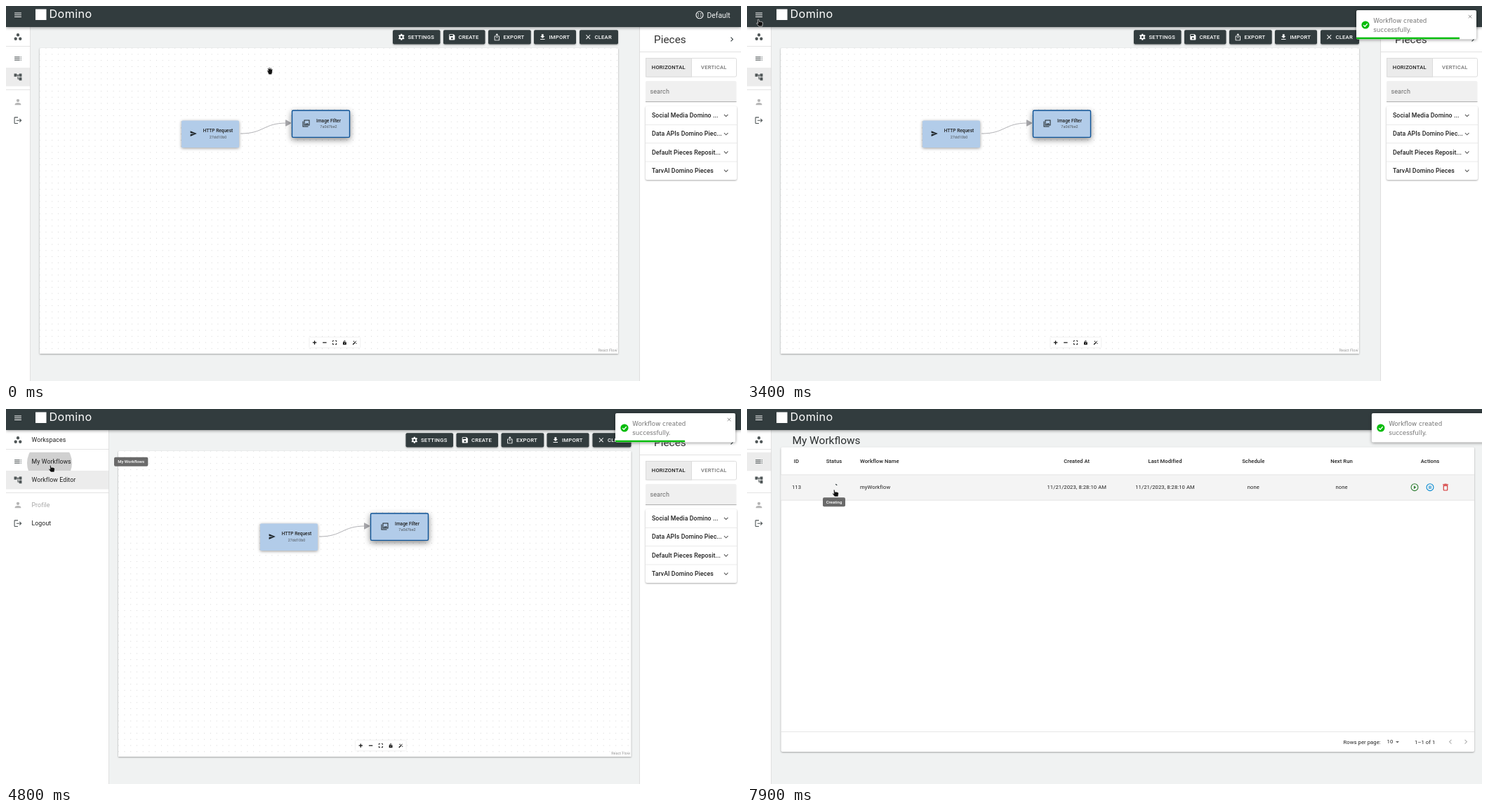
An HTML page that plays this animation: 1047x535 px, repeating every 8 s.

```html
<!DOCTYPE html>
<html lang="en">
<head>
<meta charset="utf-8">
<title>Workflow editor</title>
<style>
html, body { margin: 0; width: 100%; height: 100%; overflow: hidden; background: #f0f2f2; }
svg { display: block; width: 1047px; height: 535px; font-family: Roboto, sans-serif; }
text { white-space: pre; }
.low { filter: drop-shadow(0 1px 1px #0005); }
.mid { filter: drop-shadow(0 1px 2px #0006); }
.high { filter: drop-shadow(0 3px 4px #0007); }
.caps { letter-spacing: .02857em; font-weight: 500; }
.body { letter-spacing: .00938em; }
.cell { letter-spacing: .01071em; }
</style>
</head>
<body>
<svg id="stage" viewBox="0 0 1047 535"></svg>
<script>
const DARK = '#323c3e', INK = '#212121', GREEN = '#07bc0c';
const ICONS = {
  menu: 'M3 18h18v-2H3zm0-5h18v-2H3zm0-7v2h18V6z',
  spaces: 'M6 13a4 4 0 100 8 4 4 0 000-8zm6-10a4 4 0 100 8 4 4 0 000-8zm6 10a4 4 0 100 8 4 4 0 000-8z',
  list: 'M3 9h14V7H3zm0 4h14v-2H3zm0 4h14v-2H3zm16 0h2v-2h-2zm0-10v2h2V7zm0 6h2v-2h-2z',
  tree: 'M22 11V3h-7v3H9V3H2v8h7V8h2v10h4v3h7v-8h-7v3h-2V8h2v3z',
  person: 'M12 12a4 4 0 100-8 4 4 0 000 8zm0 2c-2.67 0-8 1.34-8 4v2h16v-2c0-2.66-5.33-4-8-4z',
  logout: 'M17 7l-1.4 1.4 2.6 2.6H8v2h10.2l-2.6 2.6L17 17l5-5zM4 5h8V3H4a2 2 0 00-2 2v14a2 2 0 002 2h8v-2H4z',
  gear: 'M10 2h4l.5 3 2 1 2.8-1.100 2 3.500-2.300 1.900v3.400l2.300 1.900-2 3.500-2.800-1.100-2 1-.5 3h-4l-.5-3-2-1-2.800 1.100-2-3.500L5 13.700v-3.400L2.700 8.400l2-3.500L7.500 6l2-1zm2 6.500a3.500 3.500 0 100 7 3.500 3.500 0 000-7z',
  save: 'M17 3H5a2 2 0 00-2 2v14a2 2 0 002 2h14a2 2 0 002-2V7zm-5 16a3 3 0 110-6 3 3 0 010 6zm3-10H5V5h10z',
  share: 'M16 5l-1.400 1.400L13 4.800V16h-2V4.800L9.400 6.400 8 5l4-4zm4 5v11a2 2 0 01-2 2H6a2 2 0 01-2-2V10a2 2 0 012-2h3v2H6v11h12V10h-3V8h3a2 2 0 012 2z',
  load: 'M5 20h14v-2H5zM19 9h-4V3H9v6H5l7 7z',
  cross: 'M19 6.400L17.600 5 12 10.600 6.400 5 5 6.400 10.600 12 5 17.600 6.400 19 12 13.400 17.600 19 19 17.600 13.400 12z',
  down: 'M16.600 8.600L12 13.200 7.400 8.600 6 10l6 6 6-6z',
  right: 'M10 6L8.600 7.400l4.600 4.600-4.600 4.600L10 18l6-6z',
  left: 'M14 6l1.400 1.400-4.600 4.600 4.600 4.600L14 18l-6-6z',
  caret: 'M7 10l5 5 5-5z',
  send: 'M2 21l21-9L2 3v7l15 2-15 2z',
  photos: 'M20 4v12H8V4zm2-2H6v16h16zM11.500 11.700l1.700 2.300 2.500-3.100L19 15H9zM2 6v16h16v-2H4V6z',
  play: 'M10 16.500l6-4.500-6-4.500zM12 2a10 10 0 100 20 10 10 0 000-20zm0 18a8 8 0 110-16 8 8 0 010 16z',
  pause: 'M9 16h2V8H9zm4-8v8h2V8zM12 2a10 10 0 100 20 10 10 0 000-20zm0 18a8 8 0 110-16 8 8 0 010 16z',
  bin: 'M6 19a2 2 0 002 2h8a2 2 0 002-2V7H6zM8 9h8v10H8zm7.500-5l-1-1h-5l-1 1H5v2h14V4z',
  plus: 'M3 10h7V3h4v7h7v4h-7v7h-4v-7H3z',
  minus: 'M3 10h18v4H3z',
  fit: 'M2 2h7v3H5v4H2zm13 0h7v7h-3V5h-4zM2 15h3v4h4v3H2zm17 0h3v7h-7v-3h4z',
  lock: 'M4 10h3V7a5 5 0 0110 0h-3a2 2 0 00-4 0v3h10v12H4zm8 4a2 2 0 100 4 2 2 0 000-4z',
  wand: 'M2 20L14 8l3 3L5 23zM15 7l2-2 3 3-2 2zM8 2l1 3 3 1-3 1-1 3-1-3-3-1 3-1zM20 13l1 2 2 1-2 1-1 2-1-2-2-1 2-1zM20 1l1 2-2 1z'
};

const rect = (x, y, w, h, fill, more = '') =>
  `<rect x="${x}" y="${y}" width="${w}" height="${h}" fill="${fill}" ${more}/>`;
const text = (x, y, s, size, fill = INK, more = '') =>
  `<text x="${x}" y="${y}" font-size="${size}" fill="${fill}" ${more}>${s}</text>`;
const path = (d, more) => `<path d="${d}" ${more}/>`;
const icon = (name, x, y, size = 13.1, fill = DARK) =>
  path(ICONS[name], `fill="${fill}" fill-rule="evenodd" transform="translate(${x - size / 2} ${y - size / 2}) scale(${size / 24})"`);
const group = (id, body, more = '') => `<g id="${id}" ${more}>${body}</g>`;
const middle = 'text-anchor="middle"', bold = 'font-weight="500"';

const button = (x, w, label, name) =>
  rect(x, 34.3, w, 20.2, DARK, `rx="2" class="low" ${name == 'save' ? 'id="create"' : ''}`) +
  icon(name, x + 12.3, 44.3, 10.9, '#fff') + text(x + 21.5, 47, label, 7.65, '#fff', 'class="caps"');

const node = (x, y, title, code, name, active) =>
  rect(x, y, 82, 38.4, '#b2cce9', `rx="1.6" class="${active ? 'high' : 'mid'}" ${active ? 'stroke="#0e5396" stroke-width="1.4"' : ''}`) +
  icon(name, x + (active ? 20 : 17), y + 18.5, active ? 12 : 10.5, '#1c2225') +
  text(x + 52, y + 16.700, title, 6.56, INK, `${middle} ${bold}`) +
  text(x + 52, y + 25.300, code, 5.46, '#50565c', middle);

const tip = (id, x, y, w, label) => group(id,
  rect(x, y, w, 13, '#616161', 'rx="2" opacity=".94"') + text(x + w / 2, y + 8.700, label, 6, '#fff', `${middle} ${bold}`));

const editor = group('editor',
  rect(48, 60, 824, 436, '#fff', 'id="paper" class="low"') +
  group('flow',
    rect(48, 60, 824, 436, 'url(#dots)', 'id="grid"') +
    path('M334 182C368 182 366 167 400 167', 'fill="none" stroke="#b1b1b5"') +
    path('M398.500 162.700L406 167l-7.500 4.300z', 'fill="#a9a9ad" stroke="#a9a9ad" stroke-linejoin="round"') +
    node(250, 163.600, 'HTTP Request', '27dd10b0', 'send') +
    node(407.500, 149, 'Image Filter', '7a0d7be2', 'photos', true)) +
  group('controls', rect(432.500, 473, 71.500, 14.200, '#fff', 'style="filter:drop-shadow(0 0 1px #0002)"') +
    ['plus', 'minus', 'fit', 'lock', 'wand'].map((n, i) => icon(n, 439.600 + i * 14.250, 480.200, 7.200, '#111')).join('')) +
  group('tools',
    button(551, 67.500, 'SETTINGS', 'gear') + button(623, 59.500, 'CREATE', 'save') +
    button(687, 60.700, 'EXPORT', 'share') + button(752, 60, 'IMPORT', 'load') +
    button(817, 55, 'CLEAR', 'cross') +
    text(870.500, 493, 'React Flow', 5.460, '#999', 'text-anchor="end"')) +
  rect(902.500, 28, 146, 510, '#fff', 'stroke="#dedede"') +
  text(923, 53, 'Pieces', 15.400, '#333') + icon('right', 1034, 47.500, 13) +
  rect(903, 65, 144, 1, '#e2e2e2') +
  rect(911.500, 74.500, 129, 26.500, '#fff', 'rx="2" stroke="#dcdcdc"') +
  rect(911.500, 74.500, 65, 26.500, '#ebebeb', 'stroke="#dcdcdc"') +
  text(943.800, 90.300, 'HORIZONTAL', 7.600, INK, `class="caps" ${middle}`) +
  text(1008.300, 90.300, 'VERTICAL', 7.600, '#757575', `class="caps" ${middle}`) +
  path('M911 137v-28q0-2 2-2h125.500q2 0 2 2v28z', 'fill="#f0f0f0"') + rect(911, 136.400, 129.500, .7, '#8c8c8c') +
  text(917.500, 125, 'search', 9, '#6b6b6b', 'class="body"') +
  rect(911, 143, 130, 105, '#fff', 'rx="2" class="low"') +
  ['Social Media Domino ...', 'Data APIs Domino Piec...', 'Default Pieces Reposit...', 'TarvAI Domino Pieces'].map((s, i) =>
    (i ? rect(911, 142.800 + i * 26.300, 130, .6, '#dcdcdc') : '') +
    text(920, 159 + i * 26.300, s, 8.750, INK, `class="body" ${bold}`) +
    icon('down', 1025.700, 156.200 + i * 26.300, 12.500, '#555')).join(''));

const stamp = '11/21/2023, 8:28:10 AM';
const columns = [['ID', 70.500, '113'], ['Status', 124, ''], ['Workflow Name', 161, 'myWorkflow'], ['Created At', 469.700, stamp],
  ['Last Modified', 595.500, stamp], ['Schedule', 721.300, 'none'], ['Next Run', 847, 'none'], ['Actions', 973, '']];
const table = group('table',
  text(64.500, 49.700, 'My Workflows', 15.450, '#2b2f30') +
  rect(48.500, 54.500, 987.500, 434.500, '#fff', 'rx="2" class="low"') +
  rect(48.500, 94, 987.500, 36, '#f4f4f4', 'id="row"') +
  [93.500, 129.800, 460].map(y => rect(48.500, y, 987.500, .7, '#dcdcdc')).join('') +
  columns.map(([head, x, value], i) => {
    const style = `class="cell" ${i == 2 ? '' : middle}`;
    return text(x, 76.600, head, 7.650, INK, `${style} ${bold}`) + text(x, 114, value, 7.650, INK, style);
  }).join('') +
  `<circle id="spinner" cx="124" cy="112" r="5.200" fill="none" stroke="${DARK}" stroke-width="1.200" pathLength="126.900"/>` +
  icon('play', 951, 111.700, 13.100, '#2e7d32') + icon('pause', 973, 111.700, 13.100, '#0288d1') +
  icon('bin', 995, 111.700, 13.100, '#d32f2f') +
  text(849.500, 477.600, 'Rows per page:', 7.650, INK, 'class="cell"') + text(911.500, 477.200, '10', 7.650, INK, 'class="cell"') +
  icon('caret', 926.500, 475, 12, '#666') + text(951, 477.600, '1–1 of 1', 7.650, INK, 'class="cell"') +
  icon('left', 1002, 474.700, 13, '#b0b0b0') + icon('right', 1024, 474.700, 13, '#b0b0b0'));

const links = [['spaces', 44, 'Workspaces'], ['list', 75, 'My Workflows'], ['tree', 101.300, 'Workflow Editor'],
  ['person', 137, 'Profile'], ['logout', 163.200, 'Logout']];
const drawer = group('drawer',
  rect(0, 28, 147, 507, '#fff') + rect(0, 88, 147, 26.500, '#ececec', 'id="current"') +
  '<circle id="ripple" cx="62" cy="77" fill="#d0d0d0" clip-path="url(#item)"/>' +
  rect(0, 57, 147, .8, '#dcdcdc') + rect(0, 119, 147, .8, '#dcdcdc') +
  links.map(([n, y]) => icon(n, 17, y, 13.100, n == 'person' ? '#b5b5b5' : '#505758')).join('') +
  group('labels', links.map(([n, y, s]) => text(36.500, y + 3.100, s, 8.750, n == 'person' ? '#a6a6a6' : INK, 'class="body"')).join('')),
  'clip-path="url(#side)"') + rect(34, 28, .8, 507, '#dadada', 'id="edge"');

const header = rect(0, -4, 1047, 34, DARK, 'class="mid"') +
  '<circle id="focus" cx="17" cy="12.500" r="10" fill="#fff" opacity=".1"/>' +
  icon('menu', 17, 12.700, 13.100, '#fff') + rect(42, 4.500, 15.500, 15.500, '#fff') +
  text(61.500, 17, 'Domino', 16.200, '#fff', 'style="font-family:Inter,sans-serif;letter-spacing:.4px"') +
  '<circle cx="988" cy="12.800" r="5" fill="none" stroke="#fff" stroke-width="1.100"/>' +
  [-1.800, 1.800].map(x => [-1.500, 1.500].map(y => `<circle cx="${988 + x}" cy="${12.800 + y}" r=".8" fill="#fff"/>`).join('')).join('') +
  text(998.500, 16.500, 'Default', 10.400, '#f2f4f4');

const toast = group('toast',
  rect(868, 6, 171, 41.500, '#fff', 'rx="2" class="mid"') +
  rect(868, 44.700, 171, 2.800, GREEN, 'id="bar" clip-path="url(#card)"') +
  `<circle cx="881" cy="27" r="5.600" fill="${GREEN}"/>` +
  path('M878.200 27.200l2 2 3.600-4', 'fill="none" stroke="#fff" stroke-width="1.300"') +
  ['Workflow created', 'successfully.'].map((s, i) =>
    text(892.300, 23.800 + i * 13.300, s, 8.720, '#757575', 'style="font-family:\'DejaVu Sans\',sans-serif"')).join('') +
  path('M1027.800 12.800l4.600 4.600m0-4.600l-4.600 4.600', 'stroke="#8a8a8a" stroke-width=".9"'));

const outline = 'fill="#111" stroke="#fff" stroke-width=".6" stroke-linejoin="round"';
const cursor = group('cursor',
  group('grab', path('M-3.800 0q-1-1.500.3-1.500l1 1-.8-3.500q.7-1.300 1.500.2l.3 1-.2-2q.9-1.200 1.600 0l.2 1.800.4-1.600q1-.8 1.500.3l-.2 2 .6-.9q1-.4 1.300.5L3.300 2 2.300 4.800h-4z', outline)) +
  group('arrow', path('M-3-5v9.500l2.200-2 1.400 3 1.400-.7-1.400-2.800h3z', outline)) +
  group('hand', path('M-2.800-4.500q.9-1.200 1.700 0l.6 3 1-.4.8.4 1-.2.8.6 1 .2.4 1.200L3.800 5h-5L-4.300.900q.2-1.300 1.300-.6l.8.7z', outline)));

document.getElementById('stage').innerHTML = `<defs>
  <pattern id="dots" x="47.700" y="59.700" width="8.747" height="8.747" patternUnits="userSpaceOnUse"><circle cx=".45" cy=".45" r=".42" fill="#aaa"/></pattern>
  <clipPath id="side"><rect id="sideBox" y="28" width="34.500" height="507"/></clipPath>
  <clipPath id="item"><rect y="61.800" width="147" height="26.300"/></clipPath>
  <clipPath id="card"><rect x="868" y="6" width="171" height="41.500" rx="2"/></clipPath>
</defs>` + rect(0, 0, 1047, 535, '#f0f2f2') + editor + table + drawer + header +
  tip('menuTip', 154, 68.700, 48.300, 'My Workflows') + tip('statusTip', 108, 126.200, 32, 'Creating') + toast + cursor;

const $ = id => document.getElementById(id);
const set = (id, attrs) => { for (const k in attrs) $(id).setAttribute(k, attrs[k]); };
const show = (id, on) => { $(id).style.display = on ? '' : 'none'; };
const move = (id, x, y = 0) => set(id, { transform: `translate(${x} ${y})` });
const clamp = v => Math.max(0, Math.min(1, v));

function bezier(x1, y1, x2, y2) {
  const at = (a, b, u) => 3 * a * u * (1 - u) ** 2 + 3 * b * u * u * (1 - u) + u ** 3;
  return p => {
    let lo = 0, hi = 1;
    for (let i = 0; i < 20; i++) {
      const m = (lo + hi) / 2;
      if (at(x1, x2, m) < p) lo = m; else hi = m;
    }
    return at(y1, y2, lo);
  };
}
const linear = p => p, ease = bezier(.25, .1, .25, 1), standard = bezier(.4, 0, .2, 1);
const inOut = bezier(.42, 0, .58, 1), bounce = bezier(.215, .61, .355, 1);

// Value at time t along [time, value...] keys.
function along(keys, t, easing = linear) {
  if (t <= keys[0][0]) return keys[0].slice(1);
  const i = keys.findIndex(k => k[0] > t);
  if (i < 0) return keys[keys.length - 1].slice(1);
  const a = keys[i - 1], b = keys[i], p = easing((t - a[0]) / (b[0] - a[0]));
  return a.slice(1).map((v, j) => v + (b[j + 1] - v) * p);
}

const trail = [[200, 376, 93], [350, 380, 103], [500, 410, 106], [700, 510, 92], [900, 605, 70], [1050, 642, 57], [1300, 644, 52],
  [2300, 644, 52], [2450, 600, 57], [2700, 350, 48], [2950, 70, 26], [3100, 18, 20], [3250, 18, 24], [3500, 18, 24],
  [3750, 39, 56], [3950, 59, 72], [4250, 66, 88], [4550, 65, 85], [5800, 65, 85], [6000, 82, 98], [6250, 126, 120]];
const enter = [[1883, 1640], [2303, -13.700], [2408, 5.500], [2513, -2.700], [2583, 0]];
const leave = [[7735, 0], [7875, -10.900], [8435, 1093]];
const pageAt = 4850;

function draw(t) {
  const onTable = t >= pageAt;
  const open = onTable ? 0 : standard(clamp((t - 3500) / 225));
  show('editor', !onTable);
  show('table', onTable);

  const shift = 112 * open, width = 824 - 93.500 * open;
  set('paper', { x: 48 + shift, width });
  set('grid', { width });
  move('flow', shift);
  move('tools', 18.500 * open);
  move('controls', 65.700 * open);
  set('create', { fill: t > 1050 && t < 2400 ? '#20282a' : DARK });

  set('sideBox', { width: 34.500 + shift });
  set('edge', { x: 34 + shift });
  set('current', { y: onTable ? 61.800 : 88 });
  set('labels', { opacity: open });
  show('focus', t >= 3450 && t < 3900);
  show('ripple', t >= 4700 && !onTable);
  set('ripple', { r: 20 + 12 * clamp((t - 4700) / 100) });
  show('menuTip', t >= 4300 && !onTable);
  show('statusTip', t >= 6350);
  show('row', t >= 5950);

  const turn = ((t - 6500) / 1400 + 10.900) % 1;
  const [dash, offset] = along([[0, 1, 0], [.5, 100, -15], [1, 100, -125]], turn, inOut);
  set('spinner', { 'stroke-dasharray': `${dash} 200`, 'stroke-dashoffset': offset, transform: `rotate(${turn * 360} 124 112)` });

  show('toast', t >= 2350);
  move('toast', t < 7735 ? along(enter, t, bounce)[0] : along(leave, t, ease)[0]);
  set('bar', { width: 171 * clamp(1 - (t - 2700) / 5000) });

  move('cursor', ...along(trail, t));
  const pose = t < 950 ? 'grab' : t < 1050 || (t >= 2400 && t < 3050) ? 'arrow' : 'hand';
  for (const p of ['grab', 'arrow', 'hand']) show(p, p == pose);
}

function loop() {
  draw(performance.now() % 8000);
  requestAnimationFrame(loop);
}
loop();
</script>
</body>
</html>
```
